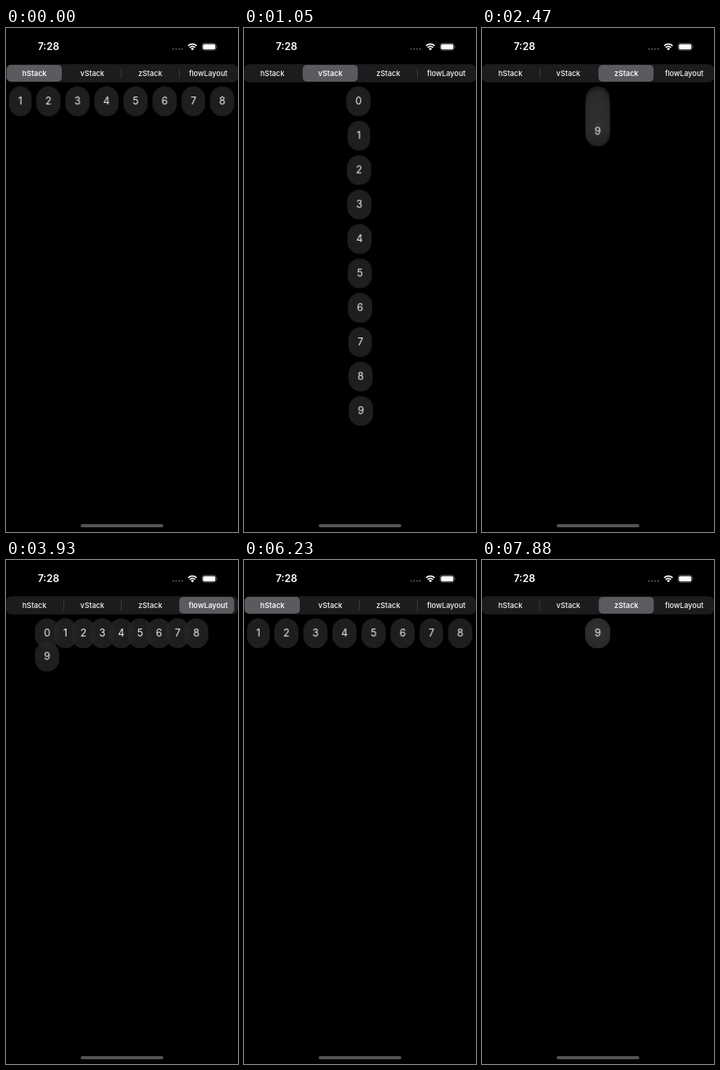
An HTML page that plays this animation: 295 px wide and 640 px high, repeating every 8 s.

```html
<!DOCTYPE html>
<html lang="en">
<head>
<meta charset="utf-8">
<title>Layout switcher</title>
<style>
  html, body { margin: 0; width: 100%; height: 100%; overflow: hidden; background: #000; }
  #stage {
    position: relative; width: 295px; height: 640px; overflow: hidden;
    background: #000; color: #f4f4f4; font-family: Inter, "Liberation Sans", sans-serif;
  }
  #stage > * { position: absolute; }
  #status { left: 0; top: 0; }
  #clock { left: 24px; width: 60px; top: 16px; font: 600 12.8px/16px Inter, sans-serif; text-align: center; color: #fff; }
  #home { left: 94.5px; top: 630px; width: 105.5px; height: 4px; border-radius: 2px; background: #545454; }
  #picker { left: 0; top: 45.5px; width: 295px; height: 23.5px; border-radius: 6.5px; background: #1c1c1e; }
  #picker > * { position: absolute; }
  #thumb { left: 0; top: 1.5px; width: 70px; height: 20.7px; border-radius: 5px; background: #5b5a5f; }
  .sep { top: 5.5px; width: 1px; height: 12.5px; background: #3b3b3e; }
  .label { top: 0; width: 74px; text-align: center; font-size: 9.3px; line-height: 23.5px; font-weight: 500; }
  .label.on { font-weight: 600; }
  .item {
    left: 0; top: 0; height: 38.2px; border-radius: 15.5px;
    text-align: center; font-size: 12.9px; line-height: 38.2px;
    background: rgba(45, 45, 46, .68);
    -webkit-backdrop-filter: blur(8px); backdrop-filter: blur(8px);
  }
</style>
</head>
<body>
<div id="stage">
  <div id="clock">7:28</div>
  <svg id="status" width="295" height="45" fill="#fff">
    <g fill="#555">
      <circle cx="212.5" cy="26.7" r="1.1"/><circle cx="216.3" cy="26.7" r="1.1"/>
      <circle cx="220.1" cy="26.7" r="1.1"/><circle cx="223.9" cy="26.7" r="1.1"/>
    </g>
    <g fill="none" stroke="#fff" stroke-width="1.7">
      <path d="M231.6 22.6A7.7 7.7 0 0 1 242.4 22.6"/>
      <path d="M233.6 24.8A4.8 4.8 0 0 1 240.4 24.8"/>
    </g>
    <path d="M237 28.5L235 26.3A2.8 2.8 0 0 1 239 26.3Z"/>
    <rect x="249.3" y="19.3" width="18" height="9" rx="2.9" fill="none" stroke="#666" stroke-width=".8"/>
    <rect x="250.4" y="20.4" width="15.8" height="6.8" rx="1.9"/>
    <path d="M268.5 22.4q1.3 1.4 0 2.8z" fill="#777"/>
  </svg>
  <div id="picker"></div>
  <div id="home"></div>
</div>
<script>
const LOOP = 8000;
const CX = 147.1, TOP = 93.2, H = 38.2, GAP = 6;
const NAMES = ["hStack", "vStack", "zStack", "flowLayout"];
const [HS, VS, ZS, FLOW] = [0, 1, 2, 3];
// at: first visible change, step: interval between ticks
const MOVES = [
  { at: 500, step: 110, from: HS, to: VS },
  { at: 2160, step: 101.4, from: VS, to: ZS },
  { at: 3720, step: 104.3, from: ZS, to: FLOW },
  { at: 5490, step: 105.7, from: FLOW, to: HS },
  { at: 6980, step: 111.4, from: HS, to: ZS },
];
const LEAD = 40; // ms already elapsed at the first visible change

const stage = document.getElementById("stage");
const picker = document.getElementById("picker");

function add(parent, cls, text = "") {
  const el = document.createElement("div");
  el.className = cls;
  el.textContent = text;
  parent.append(el);
  return el;
}

const seps = [73, 146.5, 220].map(x => {
  const el = add(picker, "sep");
  el.style.left = x - 0.5 + "px";
  return el;
});
const thumb = add(picker, "thumb");
thumb.id = "thumb";
const labels = NAMES.map((name, i) => {
  const el = add(picker, "label", name);
  el.style.left = -0.9 + 73.7 * i + "px";
  return el;
});

const widths = Array.from({ length: 10 }, (_, i) => i === 1 ? 28.7 : i === 7 ? 30.3 : 30.95);
const items = widths.map((w, i) => {
  const el = add(stage, "item", i);
  el.style.width = w + "px";
  return el;
});

// Centres of a row of items, itself centred on the stage
function row(count, gap) {
  const ws = widths.slice(0, count);
  let x = CX - (ws.reduce((a, b) => a + b) + gap * (count - 1)) / 2;
  return ws.map(w => {
    const c = x + w / 2;
    x += w + gap;
    return [c, TOP];
  });
}

const flow = row(9, 0);
flow.push([flow[0][0], TOP + H]);
const layouts = [
  row(10, GAP),
  widths.map((_, i) => [CX, TOP + i * (H + GAP - 0.1)]),
  widths.map(() => [CX, TOP]),
  flow,
];

// Critically damped spring, 0 to 1
function spring(ms, response) {
  const z = 2 * Math.PI * ms / 1000 / response;
  return 1 - (1 + z) * Math.exp(-z);
}
const mix = (a, b, p) => a + (b - a) * p;
const thumbX = i => 1 + 73.7 * i;
const sepAlpha = (sep, sel) => sel === sep || sel === sep + 1 ? 0 : 1;

function draw(t) {
  const move = MOVES.filter(m => m.at <= t).pop();
  const { from, to } = move || { from: HS, to: HS };
  const ms = move ? Math.floor((t - move.at) / move.step) * move.step + LEAD : 0;
  const p = spring(ms, 0.55);
  const q = spring(ms, 0.28);

  items.forEach((el, i) => {
    const [a, b] = [layouts[from][i], layouts[to][i]];
    const x = mix(a[0], b[0], p) - widths[i] / 2;
    const y = mix(a[1], b[1], p) - H / 2;
    el.style.transform = `translate(${x}px, ${y}px)`;
  });
  thumb.style.transform = `translateX(${mix(thumbX(from), thumbX(to), q)}px)`;
  seps.forEach((el, i) => {
    el.style.opacity = mix(sepAlpha(i, from), sepAlpha(i, to), q);
  });
  const selected = q < 0.5 ? from : to;
  labels.forEach((el, i) => el.classList.toggle("on", i === selected));
}

const start = performance.now();
function tick() {
  draw((performance.now() - start) % LOOP);
  requestAnimationFrame(tick);
}
tick();
</script>
</body>
</html>
```
